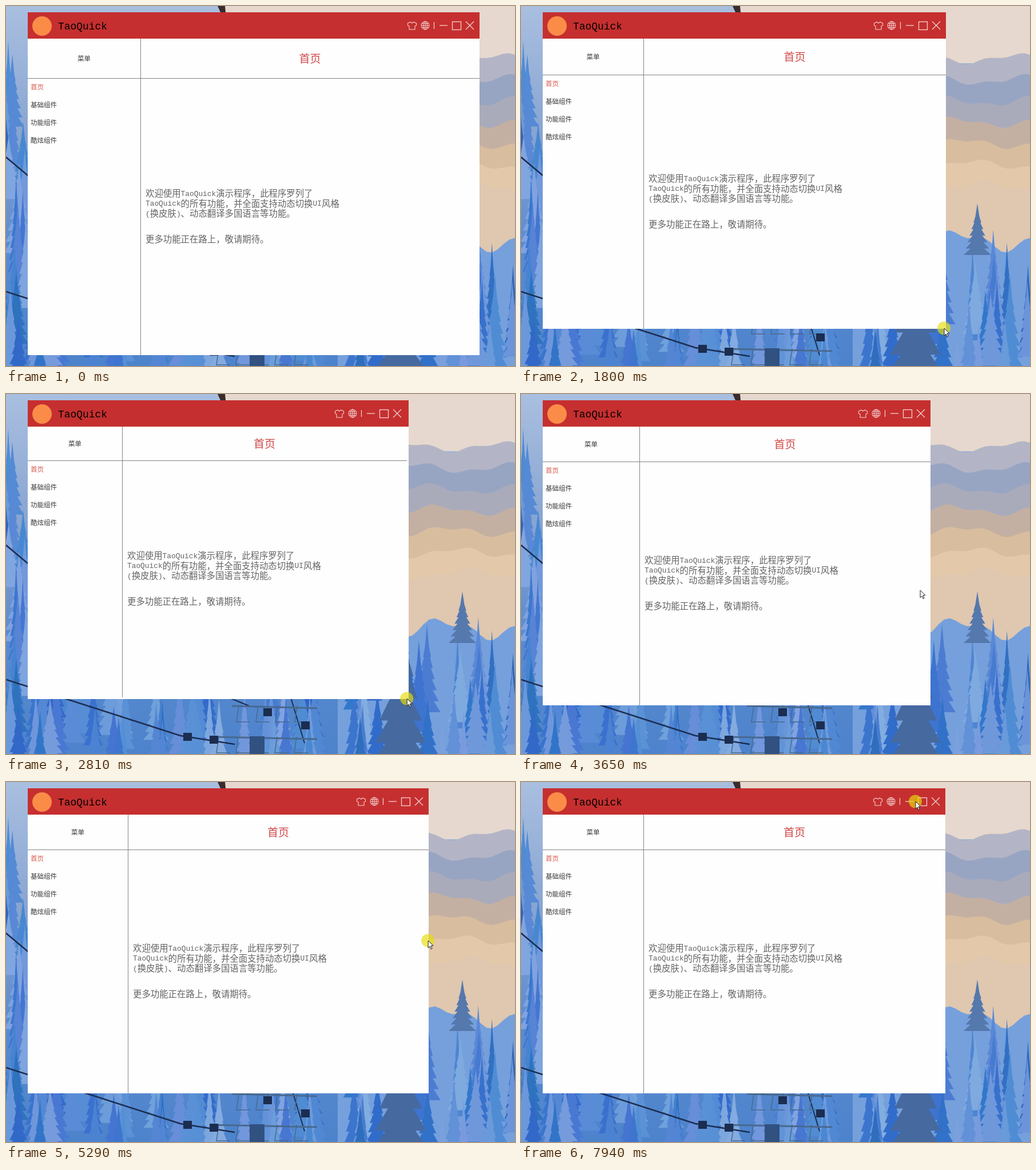
An HTML page with a canvas for the animation above (8000 ms loop, 890 by 629 pixels).

```html
<!DOCTYPE html>
<html lang="zh-CN">
<head>
<meta charset="utf-8">
<title>TaoQuick</title>
<style>
html, body { margin: 0; width: 100%; height: 100%; overflow: hidden; }
canvas { display: block; width: 890px; height: 629px; }
</style>
</head>
<body>
<canvas id="stage" width="890" height="629"></canvas>
<script>
const W = 890, H = 629, LOOP = 8000;
const LEFT = 38, TOP = 11, BAR_BOTTOM = 57;
const LAYOUT_LAG = 30; // the content follows the window frame slightly late
const ctx = document.getElementById('stage').getContext('2d');

const linear = p => p;
const easeOut = p => 1 - (1 - p) ** 3;

// A move runs from one time to another and ends at a point.
const move = (from, to, x, y, ease = linear) => ({ from, to, x, y, ease });

function follow(start, moves, t) {
  let [x, y] = start;
  for (const m of moves) {
    const p = m.ease(Math.min(1, Math.max(0, (t - m.from) / (m.to - m.from))));
    x += (m.x - x) * p;
    y += (m.y - y) * p;
  }
  return [x, y];
}

const cornerDrag = { from: 1240, to: 3280 };
const edgeDrag = { from: 4640, to: 6080 };
const click = { from: 7330, to: LOOP };
const during = (t, span) => t >= span.from && t < span.to;

const corner = t => follow([828, 610], [
  move(1240, 1470, 828, 604),
  move(1640, 1765, 743, 564),
  move(1810, 2310, 637, 471),
  move(2430, 3050, 716, 544, p => p * (2 - p)),
  move(4970, 5250, 739, 544),
  move(5290, 5600, 790, 544),
  move(5680, 6000, 742, 544)
], t);

function pointer(t) {
  const [right, bottom] = corner(t);
  if (during(t, cornerDrag)) return [right - 3, bottom - 1];
  if (during(t, edgeDrag)) return [right - 1, 277];
  if (t < cornerDrag.from) return follow([816, 632], [move(0, 1000, 825, 609)], t);
  if (t < edgeDrag.from) {
    return follow([713, 543], [move(3280, 3650, 698, 343), move(3650, 4640, 715, 277, easeOut)], t);
  }
  return follow([740, 274], [move(6150, 7160, 674, 34, easeOut), move(7650, 7940, 690, 34)], t);
}

function rect(x, y, w, h, color) {
  ctx.fillStyle = color;
  ctx.fillRect(x, y, w, h);
}

function path(points) {
  ctx.beginPath();
  for (const [x, y] of points) ctx.lineTo(x, y);
}

function shape(color, ...points) {
  ctx.fillStyle = color;
  path(points);
  ctx.fill();
}

function line(color, width, ...points) {
  ctx.strokeStyle = color;
  ctx.lineWidth = width;
  path(points);
  ctx.stroke();
}

function disc(x, y, r, color) {
  ctx.fillStyle = color;
  ctx.beginPath();
  ctx.arc(x, y, r, 0, 7);
  ctx.fill();
}

// Latin runs are half an em per letter, Chinese a full em.
function text(str, x, cy, size, color, centered) {
  ctx.fillStyle = color;
  if (centered) x -= str.length * size / 2;
  for (const run of str.match(/[ -~]+|[^ -~]+/g)) {
    const latin = run < '\x7f';
    ctx.font = latin
      ? `${size / 1.2}px "Liberation Mono", monospace`
      : `300 ${size}px "Noto Sans CJK SC", "Noto Sans CJK", sans-serif`;
    ctx.fillText(run, x, cy + size * (latin ? 0.3 : 0.38));
    x += run.length * size * (latin ? 0.5 : 1);
  }
}

function verticalGradient(...colors) {
  const g = ctx.createLinearGradient(0, 0, 0, H);
  colors.forEach((c, i) => g.addColorStop(i / (colors.length - 1), c));
  return g;
}

let seed;
function random() {
  seed = seed * 16807 % 2147483647;
  return seed / 2147483647;
}

function fir(x, y, halfWidth, height, color) {
  const tiers = 7;
  for (let i = 1; i <= tiers; i++) {
    const top = y + height * (i - 1) / (tiers + 1), w = halfWidth * i / tiers;
    shape(color, [x, top], [x + w, top + height / 4], [x - w, top + height / 4]);
  }
}

function forest(x, y, w, h, count) {
  for (let i = 0; i < count; i++) {
    const shade = `hsl(${212 + random() * 8} 60% ${46 + random() * 24}%)`;
    fir(x + random() * w, y + h * i / count, 14 + random() * 14, 110 + random() * 60, shade);
  }
}

function ridge(x0, y, height, color) {
  ctx.fillStyle = color;
  ctx.beginPath();
  ctx.moveTo(x0, H);
  for (let x = x0; x <= W; x += 10) {
    ctx.lineTo(x, y + height * (Math.sin(x / 27 + y) + Math.sin(x / 11) / 2));
  }
  ctx.lineTo(W, H);
  ctx.fill();
}

function drawBackdrop() {
  seed = 11;
  rect(0, 0, W, H, verticalGradient('#a9bfe0', '#8aa6d2', '#5b8bce', '#4d83cc'));
  rect(380, 0, W, 100, '#e6d8ce');

  // Mountains, hills and sunlit woods fall back into the distance
  const slopes = ['#b3b5c6', '#98a5c2', '#a9abbb', '#c4b0a2', '#d8bd9f', '#e3c9aa', '#dfc7b0'];
  slopes.forEach((color, i) => ridge(600, 92 + i * 37, 7, color));
  ridge(580, 410, 14, '#75a0dc');

  forest(-10, 60, 45, 380, 16);
  forest(0, 440, 540, 130, 46);
  forest(600, 385, 290, 190, 34);
  fir(798, 345, 24, 90, '#5578ad');
  fir(690, 338, 52, 310, '#46699f');

  // Cables and chair lift
  const dark = '#1b2d50', steel = '#48698f';
  shape('#3b2b2b', [370, 0], [383, 0], [384, 11], [375, 11]);
  line(dark, 2.5, [0, 264], [38, 296]);
  line(dark, 2.5, [0, 499], [305, 597], [400, 612]);
  line(dark, 2, [290, 478], [345, 512], [425, 545]);
  line(dark, 2, [482, 478], [522, 610]);
  for (let i = 0; i < 3; i++) {
    const y = 491 + i * 54, x = 430 - i * 35;
    line(steel, 3, [x, y], [544, y + 4]);
    for (let post = x + 12; post < 540; post += 34) {
      line(steel, 1.5, [post, y], [post - 4, y + 28], [post + 20, y + 28]);
    }
  }
  rect(426, 598, 26, 31, '#315181');
  for (const [x, y] of [[310, 592], [356, 597], [450, 549], [516, 572]]) rect(x, y, 15, 14, dark);
}

function drawControls(right) {
  const color = '#f1d2d2';
  const sleeve = [[3, -6], [7.5, -4], [7.5, 0], [5, 1], [5, 7]];
  const mirrored = sleeve.map(([x, y]) => [-x, y]).reverse();
  ctx.save();
  ctx.translate(right - 118, 34);
  line(color, 1.1, [0, -4], ...sleeve, ...mirrored, [0, -4]);

  ctx.translate(23, 0);
  ctx.lineWidth = 1;
  for (const radius of [7, 3.5]) {
    ctx.beginPath();
    ctx.ellipse(0, 0, radius, 7, 0, 0, 7);
    ctx.stroke();
  }
  line(color, 1, [0, -7], [0, 7]);
  for (const y of [-3.5, 0, 3.5]) line(color, 1, [-6.5, y], [6.5, y]);

  ctx.translate(15.5, 0);
  line(color, 1.2, [0, -6], [0, 6]);
  ctx.translate(16.5, 0);
  line(color, 1.3, [-7, 0], [7, 0]);
  ctx.translate(23, 0);
  ctx.strokeRect(-7.5, -6.5, 15, 14);
  ctx.translate(23, 0);
  for (const side of [-7, 7]) line(color, 1.3, [-side, -7], [side, 7]);
  ctx.restore();
}

function drawWindow(t) {
  const [frameRight, frameBottom] = corner(t).map(Math.round);
  const [right, bottom] = corner(t - LAYOUT_LAG).map(Math.round);
  const divider = Math.floor(LEFT + (right - LEFT) / 4);
  const headLine = Math.round(BAR_BOTTOM + (bottom - BAR_BOTTOM) / 8);
  const headMiddle = (BAR_BOTTOM + headLine) / 2;
  const red = '#c62f2f', grey = '#858585', ink = '#383838', body = '#646464';

  ctx.save();
  ctx.beginPath();
  ctx.rect(LEFT, TOP, frameRight - LEFT, frameBottom - TOP);
  ctx.clip();
  rect(LEFT, TOP, W, H, '#fefefe');
  rect(LEFT, TOP, W, BAR_BOTTOM - TOP, red);
  disc(63, 35, 17, '#fb8c48');
  text('TaoQuick', 91, 35, 21.5, '#000');
  drawControls(right);

  rect(divider, BAR_BOTTOM, 1, bottom - BAR_BOTTOM, grey);
  rect(LEFT, headLine, right - LEFT, 1, grey);
  text('菜单', (LEFT + divider) / 2, headMiddle, 11.5, ink, true);
  text('首页', (divider + right) / 2, headMiddle, 19, '#cf4848', true);
  ['首页', '基础组件', '功能组件', '酷炫组件'].forEach((item, i) =>
    text(item, 43, headLine + 15.5 + i * 31, 11.5, i ? ink : '#d85a4c'));

  const lines = [
    '欢迎使用TaoQuick演示程序，此程序罗列了',
    'TaoQuick的所有功能，并全面支持动态切换UI风格',
    '(换皮肤)、动态翻译多国语言等功能。'
  ];
  const x = divider + 9, y = (headLine + bottom) / 2 - 41;
  lines.forEach((str, i) => text(str, x, y + i * 17.8, 15.4, body));
  text('更多功能正在路上，敬请期待。', x, y + 80, 15.4, body);
  ctx.restore();
}

function drawPointer(t) {
  const [x, y] = pointer(t);
  if ([cornerDrag, edgeDrag, click].some(span => during(t, span))) {
    disc(x - 0.5, y, 11.5, 'rgba(230,220,10,.66)');
  }
  const arrow = [[0, 0], [0, 13], [3, 10], [5, 15], [7, 14], [5, 9], [9, 9], [0, 0]]
    .map(([dx, dy]) => [x + dx, y + dy]);
  shape('#fff', ...arrow);
  line('#222', 1, ...arrow);
}

const start = performance.now();
function tick() {
  const t = (performance.now() - start) % LOOP;
  drawBackdrop();
  drawWindow(t);
  drawPointer(t);
  requestAnimationFrame(tick);
}
tick();
</script>
</body>
</html>
```
